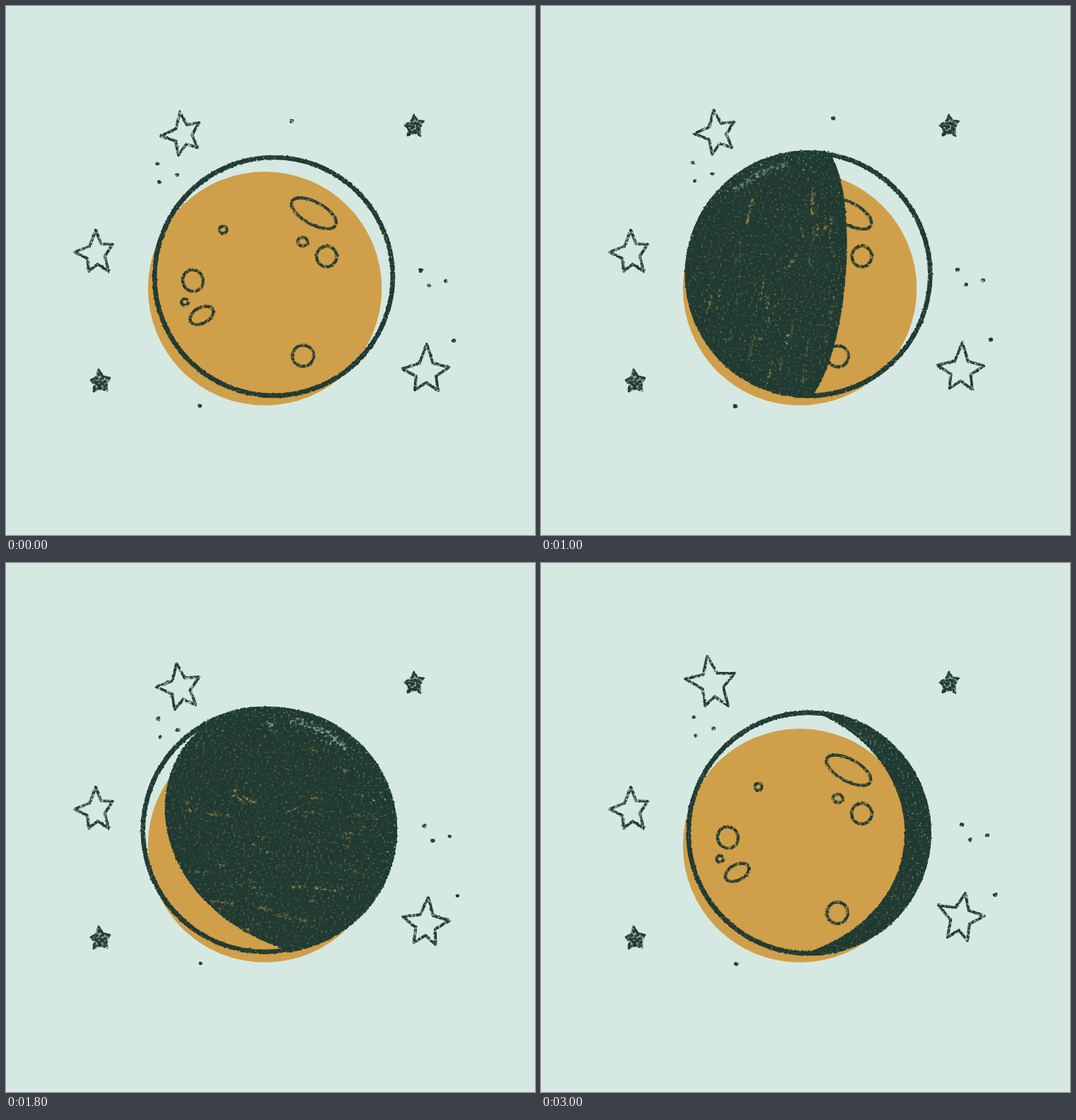
Animation, 748 px wide and 748 px high, one loop 3200 ms. Source, as an HTML page:

```html
<!DOCTYPE html>
<html lang="en">
<head>
<meta charset="utf-8">
<title>Moon phases</title>
<style>
  html, body { margin: 0; width: 100%; height: 100%; overflow: hidden; background: #d5e9e2; }
  svg { display: block; width: 100vw; height: 100vh; }
  .line { fill: none; stroke: #1f3a33; stroke-linejoin: round; stroke-linecap: round; }
  .ink { fill: #1f3a33; }
</style>
</head>
<body>
<svg viewBox="0 0 748 748">
  <defs>
    <filter id="chalk" filterUnits="userSpaceOnUse" x="80" y="110" width="590" height="490" color-interpolation-filters="sRGB">
      <feTurbulence type="fractalNoise" baseFrequency=".26" numOctaves="2" seed="4" result="noise"/>
      <feColorMatrix in="noise" values="0 0 0 0 0  0 0 0 0 0  0 0 0 0 0  0 0 0 2.6 -.4" result="grain"/>
      <feDisplacementMap in="SourceGraphic" in2="noise" scale="2.5" xChannelSelector="R" yChannelSelector="G"/>
      <feComposite in2="grain" operator="in"/>
    </filter>
    <filter id="solid" filterUnits="userSpaceOnUse" x="170" y="190" width="410" height="380" color-interpolation-filters="sRGB">
      <feTurbulence type="fractalNoise" baseFrequency=".3" numOctaves="2" seed="9" result="noise"/>
      <feColorMatrix in="noise" values="0 0 0 0 0  0 0 0 0 0  0 0 0 0 0  0 0 0 2 .2" result="grain"/>
      <feDisplacementMap in="SourceGraphic" in2="noise" scale="3" xChannelSelector="R" yChannelSelector="G"/>
      <feComposite in2="grain" operator="in"/>
    </filter>
    <filter id="scuff" filterUnits="userSpaceOnUse" x="170" y="190" width="410" height="380" color-interpolation-filters="sRGB">
      <feTurbulence type="fractalNoise" baseFrequency=".22" numOctaves="3" seed="2" result="noise"/>
      <feColorMatrix in="noise" values="0 0 0 0 0  0 0 0 0 0  0 0 0 0 0  0 0 0 5 -2.2" result="grain"/>
      <feDisplacementMap in="SourceGraphic" in2="noise" scale="6" xChannelSelector="R" yChannelSelector="G"/>
      <feComposite in2="grain" operator="in"/>
    </filter>
    <clipPath id="limb"><ellipse id="limbShape"/></clipPath>
    <mask id="worn" maskUnits="userSpaceOnUse" x="0" y="0" width="748" height="748">
      <path d="M0 0H748V748H0Z" fill="#fff"/>
      <g id="scratches" filter="url(#scuff)" fill="none" stroke="#000" stroke-linecap="round"></g>
    </mask>
  </defs>
  <circle cx="366" cy="399.5" r="165.3" fill="#d09f49"/>
  <g filter="url(#chalk)">
    <g id="craters" class="line" stroke-width="4.4"></g>
    <g id="sky" class="line" stroke-width="4"></g>
    <g id="dots" class="ink"></g>
    <g id="fixed"></g>
  </g>
  <g id="globe" filter="url(#solid)">
    <g mask="url(#worn)"><g clip-path="url(#limb)"><path id="shadow" class="ink"/></g></g>
    <circle id="ring" class="line" stroke-width="6.6"/>
  </g>
</svg>
<script>
const STEP = 200, STEPS = 16;
const $ = id => document.getElementById(id);
const rand = (i, seed) => {
  const v = Math.sin(i * 127.1 + seed * 311.7 + 17) * 43758.5453;
  return v - Math.floor(v);
};
const mix = (a, b, p) => a.map((v, i) => v + (b[i] - v) * p);
const setAttrs = (el, attrs) => Object.entries(attrs).forEach(([k, v]) => el.setAttribute(k, v));

// Star tips, clockwise from the top, at both ends of the drift
const UPPER_STAR = {
  from: [246, 150, 273, 165, 271, 200, 244, 211, 219, 184],
  to: [235, 132, 274, 156, 265, 202, 232, 202, 204, 164]
};
const LOWER_STAR = {
  from: [595, 478, 626, 511, 611, 544, 578, 543, 560, 513],
  to: [600, 467, 627, 499, 603, 534, 575, 529, 562, 484]
};
const DOT_GROUPS = [
  { drift: [2, -5], dots: [[214, 223], [242, 239], [217, 249]] },
  { drift: [9, -4], dots: [[586, 374], [598, 395], [622, 389], [633, 473]] },
  { drift: [2, 2], dots: [[274, 565]] },
  { drift: [13, -6], dots: [[404, 163]], until: 8 }
];
// cx, cy, rx, ry, tilt
const CRATERS = [
  [435.5, 293.5, 35, 15.5, 29], [419.5, 333, 7, 6, 0], [453.5, 354, 14, 14.5, 0],
  [307.5, 316, 5, 5.3, 0], [264, 388, 14.5, 15.5, -20], [252.5, 419, 4.6, 4.6, 0],
  [277, 437, 18, 11, -28], [419.5, 495, 15, 15, 0]
];

function starPath(tips, waist) {
  const pts = [0, 2, 4, 6, 8].map(i => [tips[i], tips[i + 1]]);
  const mid = [0, 1].map(a => pts.reduce((s, p) => s + p[a], 0) / 5);
  const outline = pts.flatMap((p, i) => [p, mix(mid, mix(p, pts[(i + 1) % 5], 0.5), waist)]);
  return `<path d="M${outline.join('L')}Z"/>`;
}

function drawCraters(step) {
  $('craters').innerHTML = CRATERS.map(([x, y, rx, ry, tilt], i) => {
    const wobble = n => (rand(i * 4 + n, step) - 0.5) * 1.2;
    return `<ellipse rx="${rx + wobble(0) / 2}" ry="${ry + wobble(1) / 2}"
      transform="translate(${x + wobble(2)} ${y + wobble(3)}) rotate(${tilt})"/>`;
  }).join('');
}

function drawSky(step) {
  const p = step / (STEPS - 1);
  $('sky').innerHTML = [UPPER_STAR, LOWER_STAR]
    .map(({ from, to }) => starPath(mix(from, to, p ** 1.6), 0.57)).join('');
  $('dots').innerHTML = DOT_GROUPS.map(({ drift, dots, until = STEPS }) => {
    const q = step / (until - 1);
    return q > 1 ? '' : dots.map(([x, y], i) => {
      const r = 2.6 + rand(x + i, step);
      return `<ellipse cx="${x + drift[0] * q}" cy="${y + drift[1] * q}" rx="${r}" ry="${r - 0.3}"/>`;
    }).join('');
  }).join('');
}

function drawScratches(phase, { cx, cy, rx, ry }) {
  const slant = phase > 6 ? -6 : 98;
  let out = '';
  for (let i = 0; i < 60; i++) {
    const r = n => rand(i * 6 + n, phase);
    const dist = Math.sqrt(r(0)) * 0.88, turn = r(1) * 2 * Math.PI;
    const x = cx + rx * dist * Math.cos(turn), y = cy + ry * dist * Math.sin(turn);
    const spread = i % 4 ? 12 : 110;
    const angle = (slant + (r(2) - 0.5) * spread) * Math.PI / 180;
    const len = 6 + r(3) * 30;
    out += `<path d="M${x} ${y}l${len * Math.cos(angle)} ${len * Math.sin(angle)}"
      stroke-width="${1.5 + r(4) * 3}" opacity="${0.25 + r(5) * 0.5}"/>`;
  }
  // pale rub along the upper limb
  const rim = deg => {
    const a = deg * Math.PI / 180;
    return `${cx + rx * 0.88 * Math.cos(a)} ${cy + ry * 0.91 * Math.sin(a)}`;
  };
  out += `<path d="M${rim(228)}A${rx * 0.88} ${ry * 0.91} 0 0 1 ${rim(258)}"
    stroke-width="8" opacity="${phase / 14}"/>`;
  $('scratches').innerHTML = out;
}

// Dark area left of a curve that sweeps from the left limb to the right one
function shadowPath(phase, { cx, cy, r }) {
  if (phase === 0) return '';
  if (phase === STEPS / 2) return 'M0 0H748V748H0Z';
  const middle = Math.min(515, 196 + 47 * phase);
  const top = 366 + 1.75 * phase ** 2, bottom = 420 - 18 * Math.abs(phase - 3);
  const rise = x => Math.sqrt(r ** 2 - (x - cx) ** 2);
  const y0 = cy - rise(top), y1 = cy + rise(bottom);
  const pull = (8 * middle - top - bottom) / 6;
  return `M${top} ${y0}C${pull + 8} ${y0 + 66} ${pull - 8} ${y1 - 66} ${bottom} ${y1}V748H0V0H${top}Z`;
}

// The waning half mirrors the waxing half.
function drawGlobe(step) {
  const waning = step > STEPS / 2;
  const phase = waning ? STEPS - step : step;
  const ring = { cx: 378.5, cy: 382.5 - 0.65 * phase, r: 168.5 + 1.7 * Math.min(phase, 2) };
  const swell = phase > 5 ? 13 : 0;
  const limb = { cx: ring.cx - swell / 2, cy: ring.cy, rx: ring.r + 3 + swell / 2, ry: ring.r + 3 };
  setAttrs($('ring'), ring);
  setAttrs($('limbShape'), limb);
  $('globe').setAttribute('transform', waning ? `translate(${2 * limb.cx} 0) scale(-1 1)` : '');
  $('shadow').setAttribute('d', shadowPath(phase, ring));
  drawScratches(phase, limb);
}

$('fixed').innerHTML =
  `<g class="line" stroke-width="4">${starPath([127, 317, 151, 337, 145, 375, 117, 375, 97, 348], 0.6)}</g>` +
  '<g class="ink" stroke="#1f3a33" stroke-width="3" stroke-linejoin="round">' +
  starPath([577, 154, 590, 163, 586, 183, 568, 183, 564, 168], 0.7) +
  starPath([131, 514, 147, 526, 143, 544, 124, 545, 120, 529], 0.7) + '</g>';

let shown = -1;
function render(time) {
  const step = Math.floor(time / STEP) % STEPS;
  if (step === shown) return;
  shown = step;
  drawCraters(step);
  drawSky(step);
  drawGlobe(step);
}

const start = performance.now();
function tick() {
  render(performance.now() - start);
  requestAnimationFrame(tick);
}
tick();
</script>
</body>
</html>
```
